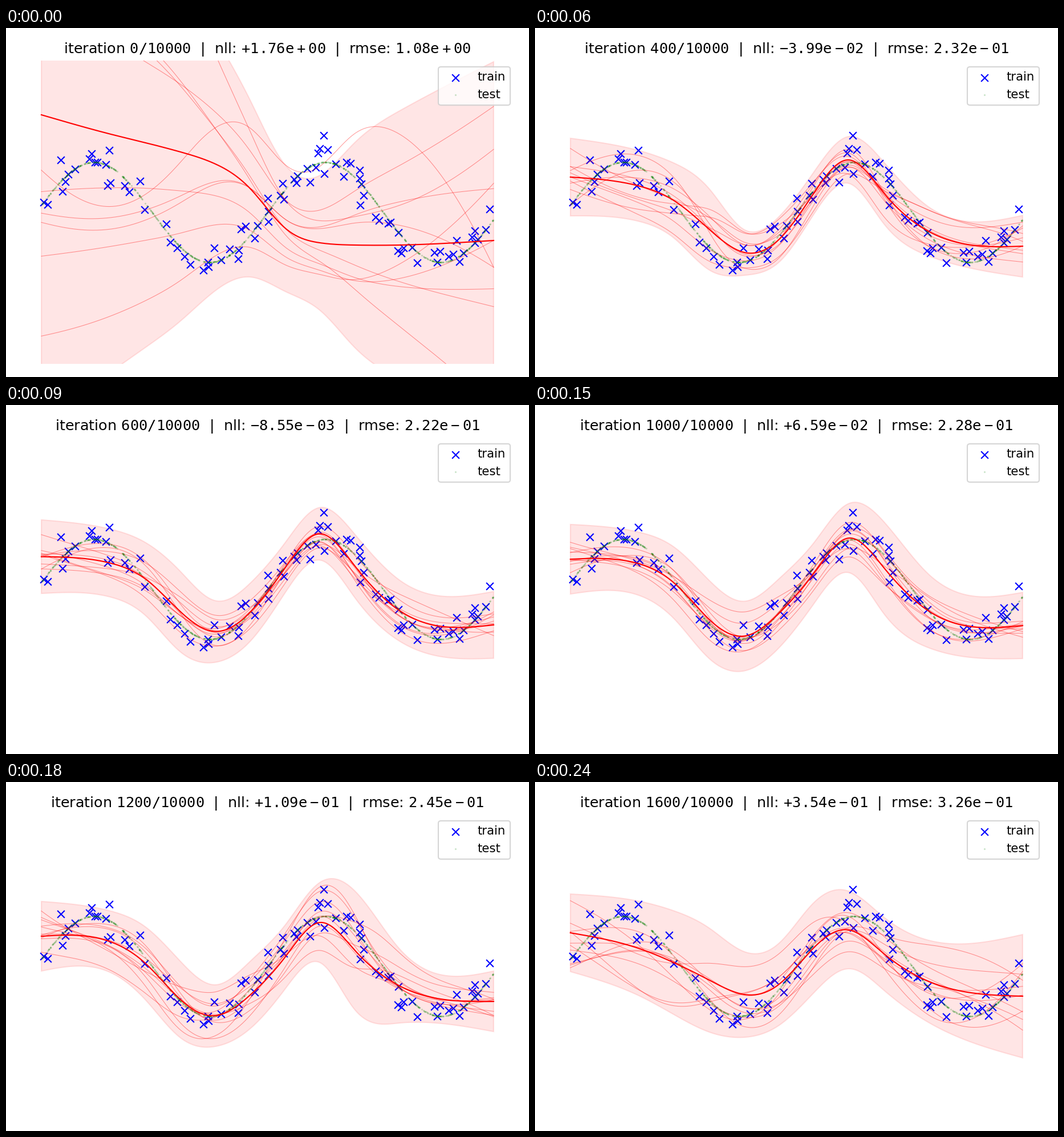
Animation, 917 px wide and 611 px high, one loop 1270 ms. Source, as a matplotlib script:

```python
import numpy as np
import matplotlib.pyplot as plt
from matplotlib.animation import FuncAnimation

WIDTH, HEIGHT, DPI = 917, 611, 128
PT = 152.8 / DPI  # scale from design points to points at this dpi
LEFT, RIGHT, TOP, BOTTOM = 22.4, 894.6, 57, 588
KNOTS = np.array([62, 184, 245, 306, 367, 428, 489, 550, 611, 690, 855])
X0, X1 = KNOTS[0], KNOTS[-1]
X = np.linspace(X0, X1, 300)
rng = np.random.default_rng(3)

# Training points: some on the wave, the others scattered around it.
ON_WAVE = [66, 109, 121, 156, 160, 175, 354, 377, 441, 460, 481, 505,
           511, 528, 578, 623, 674, 688, 712, 756, 802, 822, 827, 841]
OFF_WAVE = [
    (73, 309), (96, 231), (99, 286), (104, 269), (146, 229), (150, 220), (181, 214),
    (178, 276), (183, 271), (208, 276), (216, 287), (235, 268), (243, 318), (281, 343),
    (288, 375), (300, 385), (313, 400), (323, 414), (346, 424), (355, 418), (365, 385),
    (392, 387), (408, 389), (407, 404), (412, 352), (420, 347), (436, 368), (459, 298),
    (460, 339), (487, 300), (485, 272), (509, 271), (533, 270), (543, 244), (547, 219),
    (550, 211), (564, 213), (557, 188), (558, 255), (592, 260), (597, 235), (604, 237),
    (620, 249), (620, 263), (627, 293), (621, 310), (648, 331), (654, 337), (670, 342),
    (687, 390), (693, 394), (697, 385), (721, 411), (751, 393), (761, 391), (776, 400),
    (784, 396), (790, 372), (795, 409), (817, 366), (822, 355), (848, 317)]


def wave(x):
    return 322.5 - 87.5 * np.cos((x - 154.5) * 2 * np.pi / 405.5)


def spline(knots, y, x=X):
    """Natural cubic spline through the given knots."""
    y = np.asarray(y, float)
    h = np.diff(knots)
    inner = h[1:-1]
    system = np.diag(2 * (h[:-1] + h[1:])) + np.diag(inner, 1) + np.diag(inner, -1)
    m = np.zeros(len(y))
    m[1:-1] = np.linalg.solve(system, 6 * np.diff(np.diff(y) / h))
    k = np.clip(np.searchsorted(knots, x) - 1, 0, len(h) - 1)
    u = (x - knots[k]) / h[k]
    v = 1 - u
    bend = (v**3 - v) * m[k] + (u**3 - u) * m[k + 1]
    return v * y[k] + u * y[k + 1] + bend * h[k]**2 / 6


def snapshot(nll, rmse, mean, spread, scores=None):
    """Sample curves are the mean plus smooth scores in units of the spread."""
    center, half = spline(KNOTS, mean), spline(KNOTS, spread)
    if scores is None:
        scores = np.clip(rng.normal(0, 0.45, (10, 6)), -0.9, 0.9)
    knots = np.linspace(X0, X1, len(scores[0])) if len(scores[0]) > 4 else KNOTS[[0, 3, 6, -1]]
    draws = np.array([center + half * spline(knots, row) for row in scores])
    return nll, rmse, center, half, draws


def halfway(a, b):
    return tuple((p + q) / 2 for p, q in zip(a, b))


start = snapshot(
    1.76, 1.08,
    [152, 186, 201, 217, 238, 281, 350, 376, 380, 380, 372],
    [538, 416, 358, 296, 222, 155, 111, 118, 179, 235, 313],
    [(.18, .06, -1, .15), (.25, .23, .3, .27), (.32, .26, -.14, -.29),
     (.35, .3, -.14, .15), (.46, .48, .45, 0), (.72, .76, .58, -.32),
     (-.4, -.4, -.45, -.75), (-.45, -.39, 0, .37), (-.42, -.42, .1, .92),
     (-1, -1.04, -.45, -.51)])
at_200 = snapshot(
    0.170, 0.259,
    [251, 278, 306, 346, 378, 360, 290, 244, 279, 357, 384],
    [94, 79, 68, 76, 69, 75, 79, 66, 58, 48, 93])
at_400 = snapshot(
    -0.0399, 0.232,
    [261, 277, 303, 353, 393, 370, 289, 231, 288, 356, 382],
    [68, 62, 66, 71, 40, 40, 37, 41, 54, 43, 54])
at_800 = snapshot(
    0.0228, 0.211,
    [270, 277, 307, 371, 400, 356, 282, 220, 274, 364, 388],
    [61, 57, 62, 70, 68, 62, 51, 51, 57, 64, 63])
at_1200 = snapshot(
    0.109, 0.245,
    [270, 280, 318, 381, 409, 373, 307, 246, 294, 357, 384],
    [61, 54, 64, 67, 54, 59, 56, 70, 104, 65, 53])
at_1600 = snapshot(
    0.354, 0.326,
    [264, 292, 317, 347, 372, 354, 290, 259, 300, 349, 375],
    [68, 83, 91, 91, 75, 72, 79, 68, 64, 72, 108])

STEPS = [start, at_200, at_400, halfway(at_400, at_800), at_800,
         halfway(at_800, at_1200), at_1200, halfway(at_1200, at_1600), at_1600]

plt.rcParams.update({"font.family": "DejaVu Sans", "font.size": 10 * PT,
                     "mathtext.fontset": "dejavusans", "patch.linewidth": PT})
fig = plt.figure(figsize=(WIDTH / DPI, HEIGHT / DPI), dpi=DPI, facecolor="white")
ax = fig.add_axes([LEFT / WIDTH, 1 - BOTTOM / HEIGHT,
                   (RIGHT - LEFT) / WIDTH, (BOTTOM - TOP) / HEIGHT])
ax.axis("off")

band, = ax.fill(X, X, color="r", alpha=0.1, lw=PT, zorder=0.5)
train_x, train_y = np.array(OFF_WAVE + [(x, wave(x)) for x in ON_WAVE]).T
ax.scatter(train_x, train_y, s=36 * PT**2, c="b", marker="x", lw=PT, label="train")
test_x = rng.uniform(X0, X1, 800)
ax.scatter(test_x, wave(test_x), s=(1.5 * PT)**2, c="g", alpha=0.2, lw=0, label="test")
sample_lines = ax.plot(X, np.zeros((len(X), 10)), "r", lw=0.5 * PT, alpha=0.4)
mean_line, = ax.plot(X, X, "r", lw=PT)
ax.set(xlim=(LEFT, RIGHT), ylim=(BOTTOM, TOP))
ax.legend(loc="upper right")
title = ax.set_title("", fontsize=12 * PT, pad=6 * PT)


def mono(text):
    return rf"$\mathtt{{{text}}}$"


def update(frame):
    step = min(frame // 3, len(STEPS) - 1)
    nll, rmse, mean, half, draws = STEPS[step]
    edge = np.r_[mean - half, (mean + half)[::-1]]
    band.set_xy(np.column_stack([np.r_[X, X[::-1]], edge]))
    mean_line.set_ydata(mean)
    for line, draw in zip(sample_lines, draws):
        line.set_ydata(draw)
    title.set_text(f"iteration {mono(f'{200 * step}/10000')}  |  "
                   f"nll: {mono(f'{nll:+.2e}')}  |  rmse: {mono(f'{rmse:.2e}')}")
    return [band, mean_line, title, *sample_lines]


anim = FuncAnimation(fig, update, frames=127, interval=10, repeat=True, repeat_delay=0)
plt.show()
```
